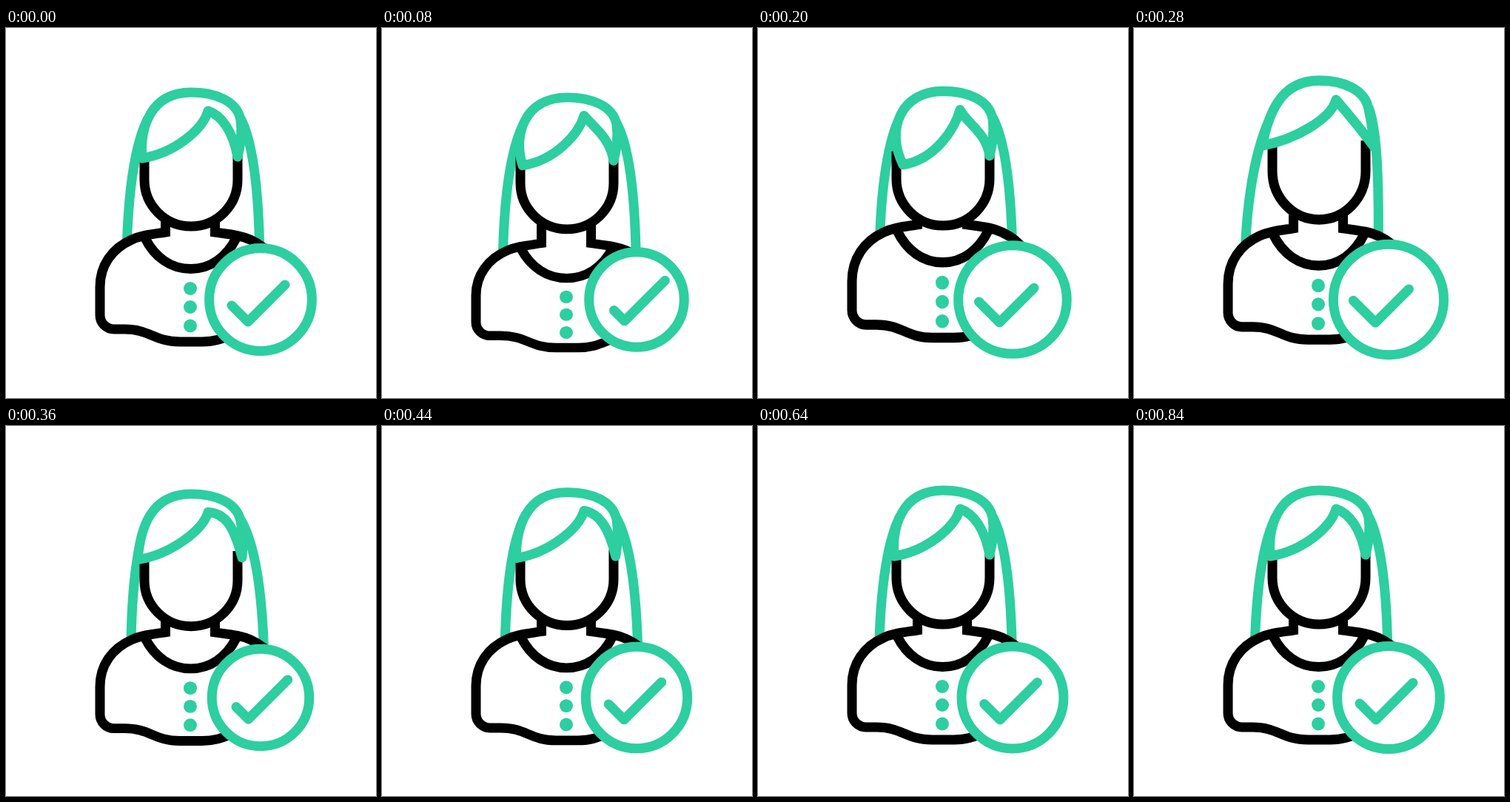
An HTML page for the animation above (880 ms loop, 500 px wide and 500 px high).

```html
<!DOCTYPE html>
<html lang="en">
<head>
<meta charset="utf-8">
<title>Approved user</title>
<style>
  html, body { margin: 0; width: 100%; height: 100%; overflow: hidden; background: #fff; }
  svg { display: block; width: 100%; height: 100%; }
  .line { fill: none; stroke-width: 13; stroke-linejoin: round; }
  .fill { fill: #fff; }
  .black { stroke: #000; }
  .green { stroke: #2dcea0; }
  .round { stroke-linecap: round; }
</style>
</head>
<body>
<svg viewBox="0 0 500 500">
  <path id="strands" class="line green"/>
  <g id="body">
    <path class="line fill black" style="stroke-linejoin: miter" d="M215.5 230V276C196 279 183 280 170 286C143 298 127 321 127 350V388A19 19 0 0 0 146 407H160C195 407 200 424 235 424H265C300 424 305 407 340 407H354A19 19 0 0 0 373 388V350C373 321 357 298 330 286C317 280 304 279 282.5 276V230"/>
    <path class="line black" d="M188 284C201 310 223 325.5 249.5 325.5C276 325.5 298 310 311 284"/>
    <g fill="#2dcea0">
      <circle cx="249" cy="352" r="9"/>
      <circle cx="249" cy="377" r="9"/>
      <circle cx="249" cy="402.5" r="9"/>
    </g>
  </g>
  <g id="head">
    <path class="line fill black" d="M187 168V205A63 63 0 0 0 313 205V165"/>
    <path id="hair" class="line fill green"/>
  </g>
  <circle id="badge" class="line fill green" cx="344" cy="367"/>
  <path id="check" class="line green round"/>
</svg>
<script>
const LOOP = 880, STEP = 40;

// Each key: time in ms, then values; eased in and out between keys.
const bodyKeys = [[0, 0], [100, 14], [210, -9.2], [370, 2.5], [520, 0]];
const headKeys = [[0, 0], [130, 10], [280, -16], [365, 5], [520, 0]];
const swayKeys = [[0, 0], [200, 1], [285, -13], [380, 8], [520, -5], [680, 1.5], [840, 0]];
const badgeKeys = [[0, 0], [110, -6.2], [245, 7.25], [370, -3.8], [500, 1.7], [600, -0.5], [840, 0]];

// Fringe: left corner x, y; right tip x; two control points of the right lock.
const restFringe = [184, 176, 313, 291, 118, 306, 138];
const fringeKeys = [
  [0, ...restFringe],
  [80, 190, 180.5, 313, 285, 127, 308, 142],
  [200, 196, 186, 313, 282, 130, 308, 142],
  [280, 173, 171.5, 325, 290, 131, 308, 152],
  [360, 178, 177, 319, 297, 113, 308, 132],
  [510, ...restFringe]
];

function sample(keys, t) {
  const next = keys.findIndex(key => key[0] > t);
  if (next < 0) return keys[keys.length - 1].slice(1);
  const [t0, ...a] = keys[next - 1], [t1, ...b] = keys[next];
  const ease = (1 - Math.cos(Math.PI * (t - t0) / (t1 - t0))) / 2;
  return a.map((v, i) => v + (b[i] - v) * ease);
}

const el = id => document.getElementById(id);
const setPath = (id, d) => el(id).setAttribute('d', d);

// Vertical squash about fixedY; a point reach above it moves by shift.
function squash(id, shift, fixedY, reach) {
  const k = shift / reach;
  el(id).setAttribute('transform', `matrix(1 0 0 ${1 - k} 0 ${k * fixedY})`);
}

function strand(x, dir, end, sway) {
  return `M${x} 122C${x + 15 * dir + sway * .3} 150 ${end - 1.5 * dir + sway * .8} 210 ${end + sway} 310`;
}

function draw(t) {
  const [lift] = sample(headKeys, t);
  const [sway] = sample(swayKeys, t);
  const [grow] = sample(badgeKeys, t);
  const [cx, cy, tip, ax, ay, bx, by] = sample(fringeKeys, t);

  squash('body', sample(bodyKeys, t)[0], 595, 270);
  squash('head', lift, 500, 413);
  squash('strands', lift, 500, 413);

  setPath('strands', strand(192, -1, 163, sway) + strand(317, 1, 343, sway));
  setPath('hair', `M${cx} ${cy}C${181 - Math.max(0, cx - 184) * .7} 140 192 87 250 87` +
    `C282 87 312 98 317 124Q${320 + (tip - 313) * .2} 148 ${tip} 174` +
    `C${bx} ${by} ${ax} ${ay} 273 112C266 137 ${cx + 44} ${cy - 7} ${cx} ${cy}Z`);

  el('badge').setAttribute('r', 69.4 + grow);
  const slide = grow * 1.5, left = 22 + slide, right = 50 - slide * .6;
  const x = 327 - slide * .1, y = 397 + slide * .15;
  setPath('check', `M${x - left} ${y - left}L${x} ${y}l${right} ${-right}`);
}

const start = performance.now();
function tick() {
  const t = (performance.now() - start) % LOOP;
  draw(Math.floor(t / STEP) * STEP);
  requestAnimationFrame(tick);
}
tick();
</script>
</body>
</html>
```
